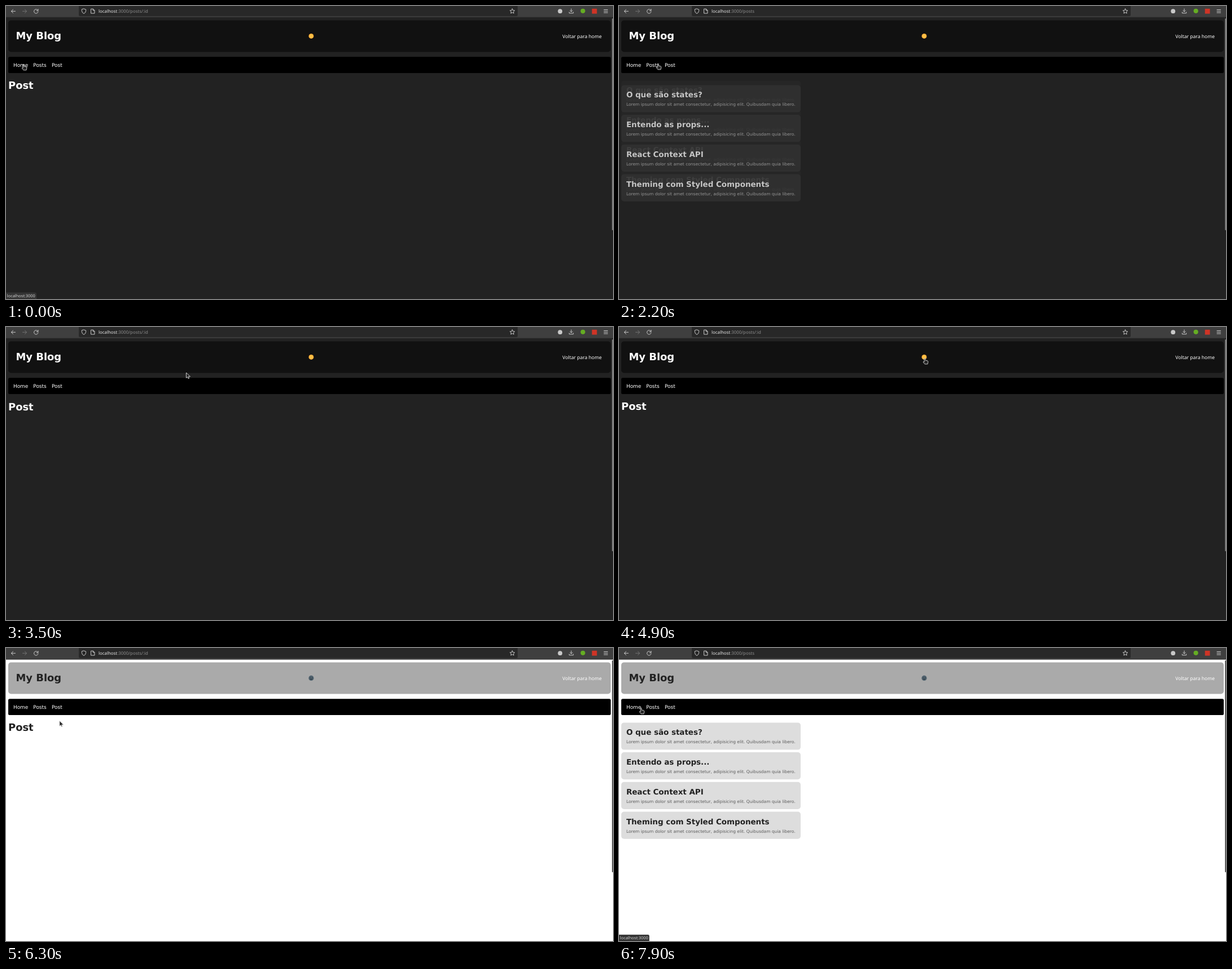
Write an HTML page that moves like this. It is 1076x520 px and loops after 8000 ms.

```html
<!DOCTYPE html>
<html lang="pt">
<head>
<meta charset="utf-8">
<title>My Blog</title>
<style>
  html, body { margin: 0; width: 100%; height: 100%; overflow: hidden; background: #222; }
  svg { display: block; width: 100vw; height: 100vh; }
  text { font-family: "DejaVu Sans", sans-serif; text-rendering: geometricPrecision; }
  .stage { --page: #222; --head: #111; --card: #333; --ink: #fff; --soft: #bcbcbc; --bar: #8c8c8c; }
  .stage.light { --page: #fff; --head: #aaa; --card: #ddd; --ink: #222; --soft: #5c5c5c; --bar: #3c3c3c; }
  .page { fill: var(--page); }
  .head { fill: var(--head); }
  .card { fill: var(--card); }
  .bar { fill: var(--bar); }
  .h1 { font-size: 17.93px; font-weight: 700; fill: var(--ink); }
  .h2 { font-size: 13.45px; font-weight: 700; fill: var(--ink); }
  .small { font-size: 7.47px; fill: var(--soft); }
  .link { font-size: 8.97px; fill: #fff; }
  .ui { font-family: "Noto Sans", "Open Sans", sans-serif; }
  .icon { fill: none; stroke: #d2d2d2; stroke-width: .95; stroke-linecap: round; stroke-linejoin: round; }
  .moon, .light .sun { display: none; }
  .light .moon { display: inline; }
  .pointer { fill: #262626; stroke: #eee; stroke-width: .8; stroke-linejoin: round; }
</style>
</head>
<body>
<svg id="stage" class="stage" viewBox="0 0 1076 520" preserveAspectRatio="none">
  <defs>
    <g id="home"><text class="h1" x="4" y="147.4">Home</text></g>
    <g id="post"><text class="h1" x="4" y="147.4">Post</text></g>
    <g id="posts"></g>
  </defs>

  <rect class="page" width="1076" height="520"/>
  <rect class="head" x="4" y="25.4" width="1068" height="56" rx="5"/>
  <text class="h1" x="17.5" y="59.4">My Blog</text>
  <g class="sun">
    <circle cx="541" cy="53.4" r="4.5" fill="#e88d24"/>
    <circle cx="541" cy="53.4" r="3.8" fill="#ffbe45"/>
  </g>
  <g class="moon">
    <circle cx="541" cy="53.4" r="4.6" fill="#51636f"/>
    <path d="M539.3 52.2v.5M542.7 52.2v.5M539 55q2 1.4 4 0" fill="none" stroke="#202b33" stroke-width="1" stroke-linecap="round"/>
  </g>
  <text class="ui" x="1056" y="56.6" font-size="8.55" fill="#fff" text-anchor="end">Voltar para home</text>

  <rect x="4" y="90.3" width="1068" height="28.7" rx="2.6"/>
  <text class="link" x="12.9" y="107.7">Home</text>
  <text class="link" x="48.3" y="107.7">Posts</text>
  <text class="link" x="81" y="107.7">Post</text>

  <use id="leaving"/>
  <use id="entering"/>
  <rect class="bar" x="1074.4" y="22" width="1.6" height="376" rx=".8"/>

  <rect width="1076" height="20.6" fill="#2a2a2a"/>
  <rect width="1076" height="19.6" fill="#3f3f3f"/>
  <path d="M129 0H907V15.5a2.5 2.5 0 0 1-2.5 2.5H131.500a2.500 2.500 0 0 1-2.500-2.500Z" fill="#282828"/>
  <g class="icon">
    <path d="M16.500 9.300H9.500M12.500 6.200 9.300 9.300 12.500 12.400"/>
    <path d="M29.500 9.300H36.500M33.500 6.200 36.700 9.300 33.500 12.400" stroke="#777"/>
    <path d="M56.500 7.500A3.700 3.700 0 1 0 57 10M57 5.500V8.300H54.200"/>
    <path d="M138 5 141.600 6.200V8.500Q141.600 11.800 138 13.500Q134.400 11.800 134.400 8.500V6.200Z"/>
    <path d="M151 5.200H154.500L157 7.700V13H151ZM154.300 5.400V8H156.800"/>
    <path id="star"/>
    <path d="M1002 5V10M999.800 8 1002 10.200 1004.200 8M998.300 10.800V12.700H1005.700V10.800"/>
    <path d="M1060 6.500H1066.500M1060 9.200H1066.500M1060 11.900H1066.500"/>
  </g>
  <circle cx="982.200" cy="9.200" r="3.900" fill="#c8c8c8"/>
  <circle cx="1022.600" cy="8.800" r="4.100" fill="#65ad23"/>
  <rect x="1038.700" y="4.800" width="8.800" height="8.800" fill="#cf3426"/>
  <text class="ui" x="164" y="11.900" font-size="7.85" fill="#8d8d8d"><tspan fill="#e6e6e6">localhost</tspan><tspan id="address"></tspan></text>

  <g id="status">
    <path id="tab" fill="#333" stroke="#444" stroke-width=".5"/>
    <text id="hint" class="ui" x="1.800" y="517.300" font-size="7.35" fill="#d4d4d4"></text>
  </g>
  <path id="pointer" class="pointer"/>
</svg>
<script>
const LOOP = 8000, TICK = 100, RISE = 30;
const $ = id => document.getElementById(id);

const HAND = 'M-.9 .8Q0-.4 .9 .8V4L4.800 4.800Q6 5.200 5.800 7.400L5 10.800H0L-2.800 7.200Q-2.500 5.800-.9 7Z';
const ARROW = 'M0 0V9.500L2.200 7.500 3.700 10.800 5.200 10.100 3.800 7H7Z';

const routes = {
  home: { path: ':3000', tab: 53.5, from: 13, to: 40 },
  posts: { path: ':3000/posts', tab: 75.5, from: 48, to: 72 },
  post: { path: ':3000/posts/:id', tab: 87.5, from: 81, to: 100 }
};

const visits = [[-1000, 'post'], [900, 'home'], [2000, 'posts'], [3100, 'post'], [7400, 'posts']];
const LIGHT_AT = 5000;

// time, x, y of the pointer tip
const moves = [
  [0, 31, 103], [100, 44, 104], [600, 44, 104], [800, 30, 104], [1000, 30, 104],
  [1600, 56, 104], [2000, 60, 104], [2200, 69, 102], [2700, 86, 104], [2800, 86, 104],
  [2900, 87, 102], [3100, 87, 102], [3900, 552, 60], [4000, 552, 60], [4300, 542, 55],
  [4900, 542, 55], [5000, 542, 56], [5100, 542, 56], [6100, 96, 130], [6200, 96, 130],
  [7200, 57, 104], [7400, 57, 104], [7900, 39, 106]
];

const lorem = 'Lorem ipsum dolor sit amet consectetur, adipisicing elit. Quibusdam quia libero.';
$('posts').innerHTML = ['O que são states?', 'Entendo as props...', 'React Context API', 'Theming com Styled Components']
  .map((title, i) => `<g transform="translate(0 ${132.4 + i * 52.7})">
    <rect class="card" x="4" width="318" height="48.2" rx="5"/>
    <text class="h2" x="12.900" y="22">${title}</text>
    <text class="small" x="12.900" y="37">${lorem}</text></g>`).join('');

$('star').setAttribute('d', 'M' + Array.from({ length: 10 }, (_, i) => {
  const r = i % 2 ? 2.1 : 4.5, a = i * Math.PI / 5;
  return `${897.5 + r * Math.sin(a)} ${9.4 - r * Math.cos(a)}`;
}).join('L') + 'Z');

function pointerAt(t) {
  const next = moves.findIndex(m => m[0] > t);
  if (next < 0) return moves[moves.length - 1].slice(1);
  const [t0, x0, y0] = moves[next - 1], [t1, x1, y1] = moves[next];
  const u = (t - t0) / (t1 - t0), e = u * u * (3 - 2 * u);
  return [x0 + (x1 - x0) * e, y0 + (y1 - y0) * e];
}

// critically damped spring from 0 to 1
function spring(ms) {
  const k = 13 * ms / 1000, p = 1 - (1 + k) * Math.exp(-k);
  return p > .98 ? 1 : p;
}

function draw(t) {
  const [since, name] = visits.filter(v => v[0] <= t).pop();
  const p = spring(t - since);
  $('stage').classList.toggle('light', t >= LIGHT_AT);
  $('address').textContent = routes[name].path;

  for (const id of ['leaving', 'entering']) $(id).setAttribute('href', '#' + name);
  $('leaving').setAttribute('opacity', 1 - p);
  $('entering').setAttribute('opacity', p);
  $('entering').setAttribute('transform', `translate(0 ${RISE * (1 - p)})`);

  const [x, y] = pointerAt(t);
  const over = y > 98 && y < 112 && Object.keys(routes).find(r => x >= routes[r].from && x <= routes[r].to);
  const onToggle = x > 536 && x < 547 && y > 48 && y < 60;
  $('pointer').setAttribute('d', over || onToggle ? HAND : ARROW);
  $('pointer').setAttribute('transform', `translate(${x} ${y})`);

  const shown = over && over !== name;
  $('status').style.display = shown ? '' : 'none';
  if (shown) {
    $('hint').textContent = 'localhost' + routes[over].path;
    $('tab').setAttribute('d', `M0 509H${routes[over].tab - 2}q2 0 2 2V520H0Z`);
  }
}

const start = performance.now();
function frame() {
  const t = (performance.now() - start) % LOOP;
  draw(Math.floor(t / TICK) * TICK);
  requestAnimationFrame(frame);
}
frame();
</script>
</body>
</html>
```
